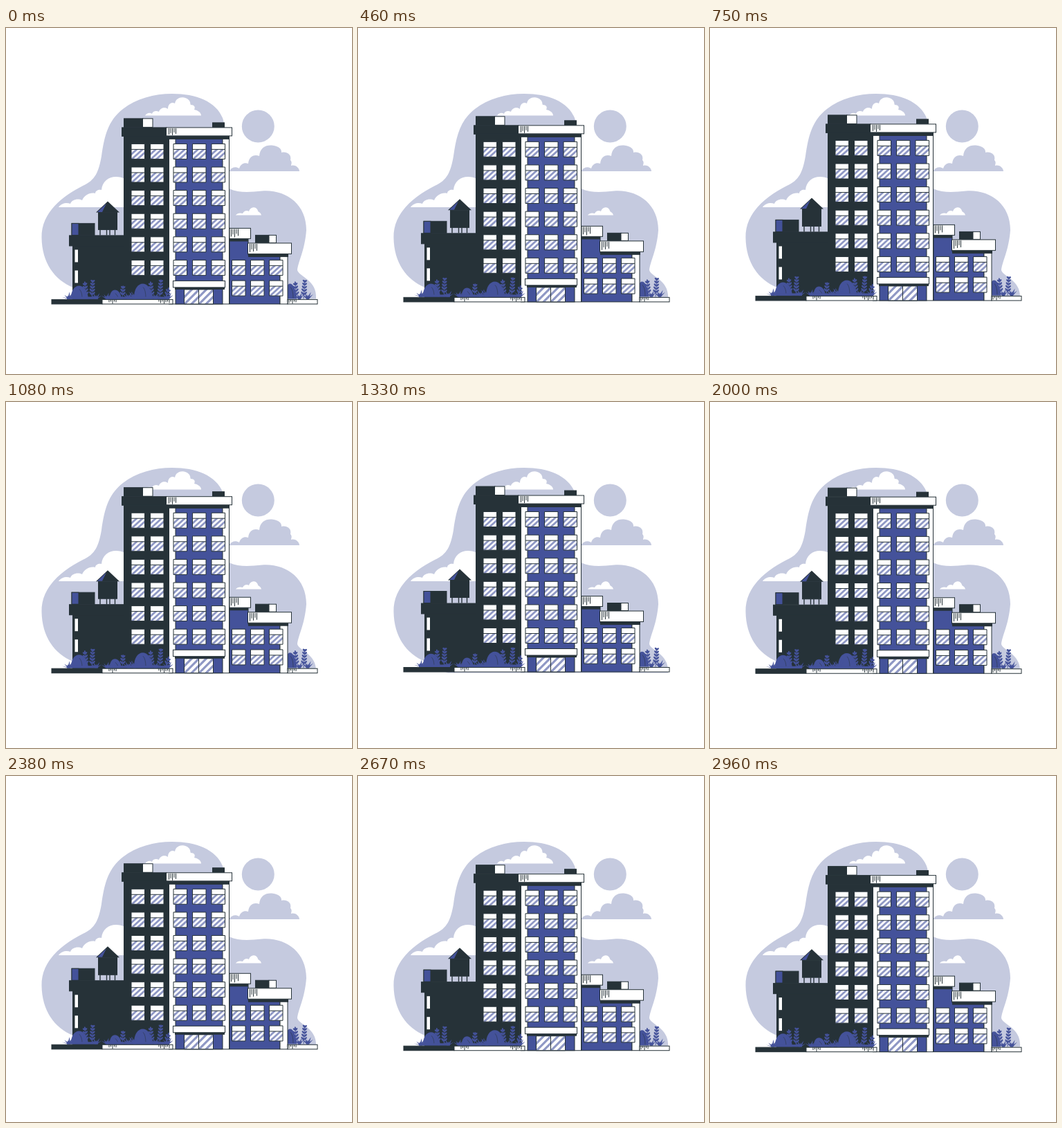
An HTML page for the animation above (3000 ms loop, 500 by 500 pixels).

```html
<!DOCTYPE html>
<html lang="en">
<head>
<meta charset="utf-8">
<title>Floating building</title>
<style>
  html, body { margin: 0; width: 100%; height: 100%; overflow: hidden; background: #fff; }
  svg { display: block; width: 100vw; height: 100vh; }
</style>
</head>
<body>
<svg id="stage" viewBox="0 0 500 500"></svg>
<script>
const BLUE = '#44529a', DARK = '#263238', PALE = '#c5cadf', TINT = '#8f98c5', WHITE = '#fff';
const PERIOD = 3000, LIFT = 10, REST = .4;

const path = (d, fill, extra = '') => `<path d="${d}" fill="${fill}" ${extra}/>`;
const line = (d, width = 1, color = DARK) => path(d, 'none', `stroke="${color}" stroke-width="${width}"`);

// Rectangle from two corners; outlined unless edge is 0
const box = (x1, y1, x2, y2, fill, edge = 1) =>
  `<rect x="${x1}" y="${y1}" width="${x2 - x1}" height="${y2 - y1}" fill="${fill}" stroke="${DARK}" stroke-width="${edge}"/>`;

const hatch = (x, y, lengths, gap = 2.5) =>
  lengths.map((len, i) => line(`M${x + i * gap} ${y}v${len}`, 1)).join('');

const use = (id, x, y) => `<use href="#${id}" x="${x}" y="${y}"/>`;

function windows(xs, top, rows, pitch) {
  let out = '';
  for (let r = 0; r < rows; r++)
    for (const x of xs) out += use('window', x, top + r * pitch);
  return out;
}

// Stem with paired leaves
function sprig(x, height, lean, base = 391) {
  let out = line(`M0 0V${-height}`, .9, BLUE);
  for (let y = 6; y < height; y += 4.6) {
    const size = 3.2 - 1.2 * y / height;
    for (const side of [-1, 1])
      out += `<ellipse cx="${side * size}" cy="${-y}" rx="${size}" ry="1.25" fill="${BLUE}"
        transform="rotate(${-side * 45} 0 ${-y})"/>`;
  }
  out += `<ellipse cy="${-height}" rx="1.1" ry="2.2" fill="${BLUE}"/>`;
  return `<g transform="translate(${x} ${base}) rotate(${lean})">${out}</g>`;
}

// Fan of pointed blades
function tuft(x, size, from, to, base = 391) {
  let out = '';
  for (let i = 0; i < 5; i++) {
    const a = (from + (to - from) * i / 4) * Math.PI / 180;
    const len = size * (.75 + .25 * Math.sin(i * 2 + 1));
    out += path(`M${x - 2} ${base}L${x + len * Math.sin(a)} ${base - len * Math.cos(a)}L${x + 2} ${base}z`, BLUE);
  }
  return out;
}

const mound = (x, rx, h, base = 391) =>
  path(`M${x - rx} ${base}C${x - rx - 1} ${base - h * 1.3} ${x + rx - 1} ${base - h * 1.35} ${x + rx + 1} ${base}z`, BLUE) +
  line(`M${x} ${base - h + 5}q4 4 4 ${h - 6}`, .5);

const defs = `<defs>
  <clipPath id="pane"><rect y="8" width="19.5" height="14"/></clipPath>
  <clipPath id="glass"><rect width="21" height="21"/></clipPath>
  <g id="window">
    ${box(0, 0, 19.5, 22, WHITE, 0)}
    <g clip-path="url(#pane)">${line('M-3 18L9 7M0 23L18 6.500M8 23L24 8.500', 2.8, TINT)}</g>
    ${line('M0 8H19.5M0 0H19.5V22H0z')}
  </g>
  <g id="door">
    ${box(0, 0, 21, 21, WHITE, 0)}
    <g clip-path="url(#glass)">${line('M-2 13L13 -2M-2 23.500L23.500 -2M8 23.500L24 7.500', 3.2, TINT)}</g>
    ${line('M0 0H21V21H0z')}
  </g>
</defs>`;

const backdrop = [
  path(`M51.5 303C51 266 82 243 111 228C129 220 134 208 138 185C142 157 147 134 169 117C188 102 214 95 240 95
    C275 95 303 106 313 130C322 152 300 222 322 232C338 239 353 237 370 235.500C404 233 434 254 434 292
    C432 321 422 338 421 350C424 360 450 364 448 391.500H130C120 388 108 380 97 375C70 364 52 339 51.5 303z`, PALE),
  `<circle cx="364.3" cy="142" r="23.5" fill="${PALE}"/>`,
  path(`M201 126.5C204 122 208 122 211 124C212 120 217 119 221 121C223 115 230 114 234 117
    C234 110 239 106 244 109C246 99 258 98 264 104C267 107 266 110 267 111C272 111 274 114 272 118
    C277 119 282 122 282 126.5z`, WHITE),
  path(`M322 207C326 201 332 200 337 203C339 196 345 194 350 196C351 186 358 182 366 185
    C367 173 375 169 384 169.500C393 170 399 175 398 180C407 178 413 184 411 191C414 194 412 197 412 199
    C419 197 424 203 424 207z`, PALE),
  path(`M76 259C80 253 88 252 93 254C95 248 104 246 110 249C113 242 121 237 129 239
    C129 235 134 233 138 234C139 222 148 215 159 215C164 215 168 216 172 218V259z`, WHITE),
  path(`M332 270.500C334 267 339 267 342 268C344 264 348 263 351 265C353 258 362 257 364 264
    C364 266 368 266 369 270.500z`, WHITE)
].join('');

const ground = box(66, 392, 139, 398.5, DARK) + box(139, 392, 241, 398.5, WHITE) +
  box(407, 392, 450, 398.5, WHITE) +
  hatch(149, 392, [4, 3, 6, 3, 4]) + hatch(221, 392, [3, 5, 3, 6, 4, 3, 5]) + hatch(409, 392, [5, 3, 6, 3, 4]);

const rightShrubs = mound(411, 8, 22) + sprig(420, 23, -5) + sprig(430, 25, 4) +
  tuft(424, 10, -50, 45) + tuft(436, 12, -50, 50);

const leftBlock = [
  line('M136 291V299M145.500 291V299M150 291V299M157.500 291V299', 1.4),
  box(133.5, 266, 160.5, 291, DARK),
  path('M130 266L147 250L164 266z', DARK),
  path('M132 265.500L145 253L139 265.500z', BLUE),
  box(95, 282, 128, 299, DARK), box(95, 282, 105, 299, BLUE),
  box(96.5, 314, 171, 392, DARK), box(91.5, 299.5, 171, 314.5, DARK),
  box(99.5, 320, 104, 338, WHITE, 0), box(99.5, 350, 104, 368, WHITE, 0)
].join('');

const rightBlock = [
  path('M323 304H350V328H396V398.500H323z', BLUE, `stroke="${DARK}"`),
  box(323, 304, 350, 308, DARK, 0),
  box(323, 289, 353.5, 304, WHITE), hatch(325.5, 290, [11, 8, 12, 7, 10]),
  box(360.5, 299, 380, 310, DARK), box(380, 299, 390.5, 310, WHITE),
  box(396, 326, 407, 398.5, WHITE),
  box(350, 326, 408, 330.5, DARK, 0),
  box(349.5, 310.5, 412.5, 326, WHITE), hatch(352.5, 311.5, [12, 8, 11, 7, 10]),
  windows([326.5, 353.5, 380.5], 335, 2, 29.7)
].join('');

const tower = [
  box(170.5, 130.5, 198, 143, DARK), box(197.5, 130.5, 212, 143, WHITE),
  box(298.5, 136.5, 315.5, 143, DARK),
  box(170.5, 156, 235.5, 392, DARK),
  box(235.5, 156, 322.5, 398.5, WHITE), box(245, 160, 313, 398.5, BLUE),
  box(236, 156, 323, 160.5, DARK, 0),
  box(167.5, 143.5, 232, 156, DARK), box(231.5, 143.5, 326.5, 155.5, WHITE),
  hatch(235.5, 144.5, [9, 7, 10, 6, 8]),
  windows([181, 208.5], 167, 6, 33.6),
  windows([242, 269.5, 297], 167, 6, 33.6),
  use('door', 257.5, 377.5), use('door', 278.5, 377.5),
  box(244, 374, 316, 377.5, DARK, 0), box(241.5, 365, 316.5, 374.5, WHITE)
].join('');

const leftShrubs = [
  tuft(91, 11, -75, 30), mound(106, 12, 19), sprig(116, 23, -5), sprig(124, 25, 3), tuft(130, 11, -50, 60),
  tuft(146, 10, -60, 40), mound(158, 8, 13), sprig(168, 17, 4), tuft(177, 13, -50, 50),
  mound(198, 13, 22), tuft(186, 14, -40, 35), sprig(211, 23, -5), sprig(222, 26, 4),
  tuft(216, 11, -45, 45), sprig(231, 15, 15), tuft(234, 11, -50, 55),
  box(88, 388, 133, 391.5, BLUE, 0), box(146, 388, 236, 391.5, BLUE, 0)
].join('');

const stage = document.getElementById('stage');
stage.innerHTML = defs + backdrop +
  `<g id="building">${rightShrubs + leftBlock + rightBlock + tower + leftShrubs + ground}</g>`;
const building = document.getElementById('building');

// Constant-speed rise and fall
function frame() {
  const p = performance.now() % PERIOD / PERIOD;
  const y = REST - LIFT * (1 - Math.abs(1 - 2 * p));
  building.setAttribute('transform', `translate(0 ${y.toFixed(3)})`);
  requestAnimationFrame(frame);
}
frame();
</script>
</body>
</html>
```
